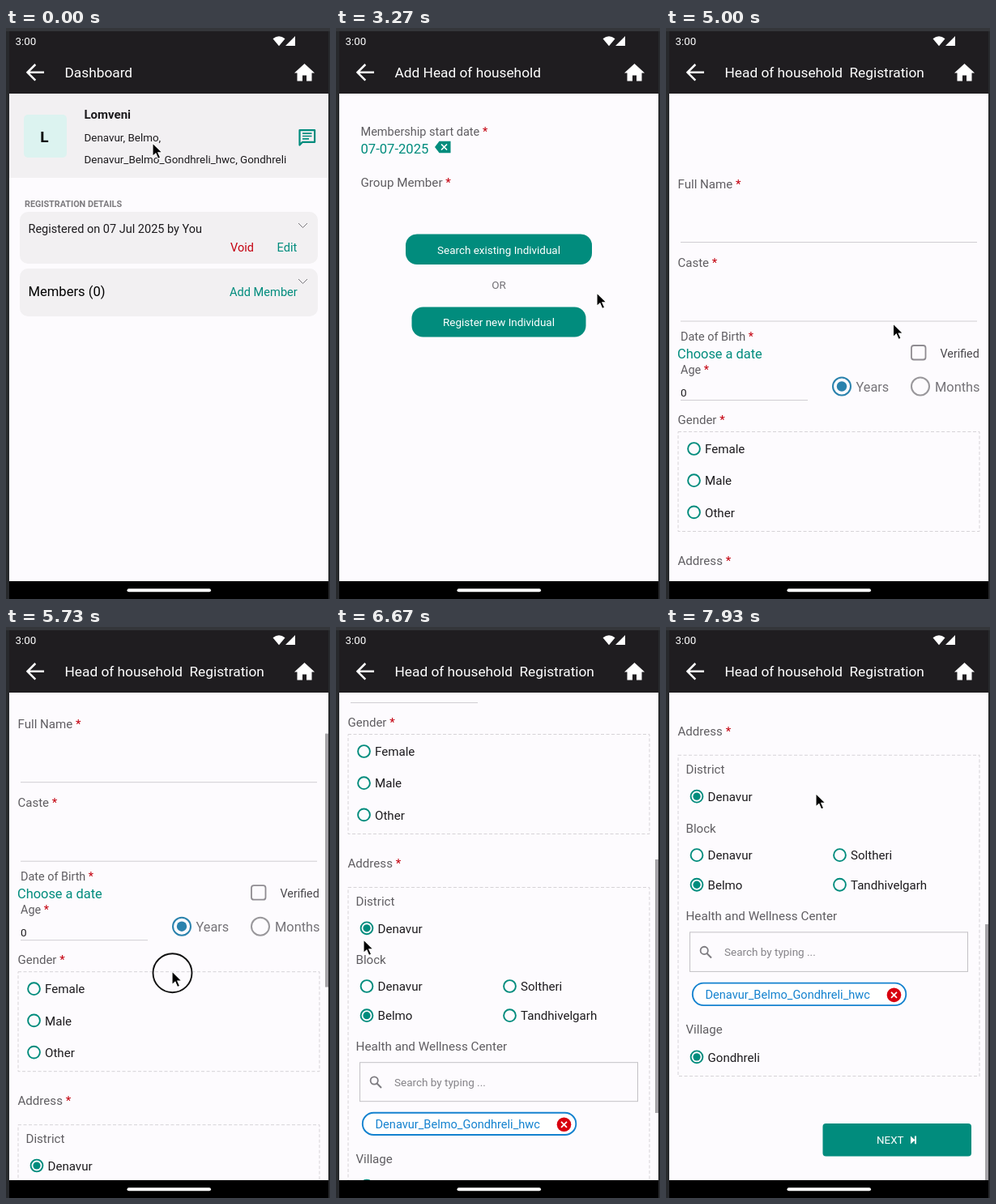
Animation of 400x705 px, one loop 8000 ms. Source, as an HTML page:

```html
<!DOCTYPE html>
<html lang="en">
<head>
<meta charset="utf-8">
<title>Household registration</title>
<style>
  html, body { margin: 0; width: 100%; height: 100%; overflow: hidden; background: #1f1d20; }
  svg { display: block; width: 100%; height: 100%; }
  text { font-family: Roboto, "Noto Sans", sans-serif; white-space: pre; }
</style>
</head>
<body>
<svg id="stage" viewBox="0 0 400 705" xmlns="http://www.w3.org/2000/svg"></svg>
<script>
const LOOP = 8000;
const TEAL = '#018c7d', GREY = '#5f5d61', DARK = '#1d1b1e', PAPER = '#fdfbfe', PANEL = '#f2f0f2', RED = '#c4000f';
const PLACE = { district: 'Denavur', block: 'Belmo', village: 'Gondhreli' };
const CENTER = `${PLACE.district}_${PLACE.block}_${PLACE.village}_hwc`;
const TOP = 93, BOTTOM = 683;  // scrolling area

// Drawing helpers
const text = (x, y, size, str, fill = DARK, more = '') =>
  `<text x="${x}" y="${y}" font-size="${size}" fill="${fill}" ${more}>${str}</text>`;
const rect = (x, y, w, h, fill, r = 0, more = '') =>
  `<rect x="${x}" y="${y}" width="${w}" height="${h}" rx="${r}" fill="${fill}" ${more}/>`;
const path = (d, stroke, width, more = '') =>
  `<path d="${d}" fill="none" stroke="${stroke}" stroke-width="${width}" ${more}/>`;
const label = (x, y, size, str) =>
  text(x, y, size, `${str} <tspan fill="${RED}">*</tspan>`, GREY);
const dashed = (y, h) =>
  rect(15, y, 372, h, 'none', 0, 'stroke="#d6d3d7" stroke-width="1" stroke-dasharray="4 2.5"');
const ring = (x, y, r, color, dot = 0, width = 2) =>
  `<circle cx="${x}" cy="${y}" r="${r}" fill="none" stroke="${color}" stroke-width="${width}"/>` +
  (dot ? `<circle cx="${x}" cy="${y}" r="${dot}" fill="${color}"/>` : '');
const option = (x, y, str, on, gap = 13.5) =>
  ring(x, y, 7.4, TEAL, on ? 4.6 : 0, 1.9) + text(x + gap, y + 5.7, 15.1, str);
const chevron = y => path(`M361 ${y}l5.5 5.5 5.5-5.5`, '#77757a', 1);
const mid = 'text-anchor="middle"';
const bold = 'font-weight="700"';

const dashboard = () =>
  rect(4, 81, 394, 104, PANEL) +
  rect(22, 107, 53, 53, '#dcf3f0', 5) +
  text(47.5, 141, 19, 'L', '#000', `${mid} ${bold}`) +
  text(96.5, 112, 15, 'Lomveni', DARK, bold) +
  text(96.5, 140, 13.4, `${PLACE.district}, ${PLACE.block},`) +
  text(96.5, 167, 13.4, `${CENTER}, ${PLACE.village}`) +
  path('M362.5 144.5V126.2h18.6v14.6h-15z', TEAL, 2.2, 'stroke-linejoin="round"') +
  path('M366 130.2h11.5M366 133.5h11.5M366 136.8h8', TEAL, 1.7) +
  text(23, 221, 10.8, 'REGISTRATION DETAILS', '#7c7a7e', bold) +
  rect(17, 227, 368, 64, PANEL, 10) +
  text(27.5, 253, 14.5, 'Registered on 07 Jul 2025 by You') + chevron(241) +
  text(277, 276, 14.5, 'Void', RED) + text(334.5, 276, 14.6, 'Edit', TEAL) +
  rect(17, 297, 368, 59, PANEL, 10) +
  text(27.5, 330.5, 16.6, 'Members (0)', '#000') + chevron(310) +
  text(276, 331, 14.6, 'Add Member', TEAL);

const addHead = () =>
  label(30.5, 133, 14.5, 'Membership start date') +
  text(30.5, 155, 16.6, '07-07-2025', TEAL) +
  `<path d="M122 147l5.5-7.2h14v14.4h-14z" fill="${TEAL}"/>` +
  path('M130 143.5l7 7m0-7l-7 7', '#fff', 1.7) +
  label(30.5, 196, 15.2, 'Group Member') +
  rect(86, 254.5, 230, 37.5, TEAL, 14) +
  text(201, 278.5, 13.45, 'Search existing Individual', '#fff', mid) +
  text(201, 321.5, 13.5, 'OR', '#757378', mid) +
  rect(93.5, 344.5, 215, 37, TEAL, 14, 'id="button"') +
  text(201, 368, 13.45, 'Register new Individual', '#fff', `${mid} id="caption"`);

const form = () =>
  label(14.5, 126, 15.1, 'Full Name') + path('M18 192.5H384', '#d0ced2', 1) +
  label(14.5, 222.5, 15, 'Caste') + path('M18 290H384', '#d0ced2', 1) +
  label(18, 313.7, 14.4, 'Date of Birth') +
  text(14, 335.7, 16.4, 'Choose a date', TEAL) +
  rect(303, 320, 17.5, 17.5, 'none', 3, 'stroke="#8f8c91" stroke-width="1.8"') +
  text(338.5, 334.7, 14.3, 'Verified', '#4a484c') +
  label(18, 355.3, 14.4, 'Age') +
  text(18, 382.5, 13.5, '0') + path('M18 387.5H175', '#d0ced2', 1) +
  ring(217, 370.5, 11, '#2a82ad', 6.2) + text(234.5, 376.5, 16.3, 'Years', '#757378') +
  ring(314, 370.5, 11, '#99979b') + text(332, 376.5, 16.4, 'Months', '#757378') +
  label(14.5, 417, 15, 'Gender') + dashed(426.5, 123) +
  ['Female', 'Male', 'Other'].map((s, i) => option(34.5, 447.5 + 39.2 * i, s)).join('') +
  label(14.5, 591, 15.1, 'Address') + dashed(615.5, 392) +
  text(24.5, 638, 15.1, 'District', GREY) + option(38, 665.8, PLACE.district, true) +
  text(24.5, 709.7, 15.1, 'Block', GREY) +
  option(38, 737.5, PLACE.district) + option(214.5, 737.5, 'Soltheri') +
  option(38, 773.7, PLACE.block, true) + option(214.5, 773.7, 'Tandhivelgarh') +
  text(24.5, 817.3, 15.25, 'Health and Wellness Center', GREY) +
  rect(29.5, 831.7, 343, 48, 'none', 0, 'stroke="#c3c1c5" stroke-width="1"') +
  ring(47.2, 854, 4.6, '#7d7b80', 0, 1.8) + path('M50.5 857.5l5.5 5.5', '#7d7b80', 2) +
  text(72, 860.7, 13.5, 'Search by typing ...', '#858388') +
  rect(32.8, 893.8, 263.5, 27.2, '#fff', 13.6, 'stroke="#1482cf" stroke-width="1.9"') +
  text(48.5, 913, 14.6, CENTER, '#1482cf') +
  `<circle cx="281.5" cy="908.3" r="8.8" fill="#d8000f"/>` +
  path('M278 904.8l7 7m0-7l-7 7', '#fff', 1.7) +
  text(24.5, 955.5, 15.1, 'Village', GREY) + option(38, 984, PLACE.village, true) +
  rect(193.5, 1065.3, 183.5, 40, TEAL, 4) +
  text(260, 1090.2, 13.4, 'NEXT', '#fff') +
  `<path d="M302 1080.700l5.500 4.800-5.500 4.800zM307 1080.700h2v9.600h-2z" fill="#fff"/>`;

const chrome = () =>
  rect(0, 0, 400, 81, '#1f1d20') + rect(0, 0, 400, 4, '#34363a') +
  text(11.5, 21, 13.4, '3:00', '#fff') +
  '<path d="M329.5 13.2Q337 7.5 344.5 13.2L337 22.3zM357 10v12h-12z" fill="#fff"/>' +
  path('M47 54.8H27M36.3 45l-9.8 9.8 9.8 9.8', '#fff', 2.5) +
  text(72.5, 61, 17.3, '', '#fff', 'id="title"') +
  '<path d="M368.5 44l12.5 11.5h-3.5v10h-6.5v-7h-5v7h-6.5v-10h-3.5z" fill="#fff"/>' +
  rect(0, BOTTOM, 400, 22, '#000') + rect(149.5, 692.3, 103.5, 4, '#fff', 2) +
  rect(0, 4, 4, 701, '#27292c') + rect(398, 4, 2, 701, '#27292c');

const stage = document.getElementById('stage');
stage.innerHTML =
  rect(0, 0, 400, 705, PAPER) +
  `<g id="page0">${dashboard()}</g><g id="page1">${addHead()}</g>` +
  `<g id="page2"><g id="view"><g id="form">${form()}</g>${rect(394, TOP, 4, 313, '#a5a3a7', 0, 'id="bar"')}</g>
   ${rect(4, 81, 394, TOP - 81, PAPER)}</g>` +
  chrome() +
  `<g id="cursor"><circle id="touch" cx="0.5" cy="2" r="24" fill="none" stroke="#111" stroke-width="1.9"/>
   <path d="M0 0V16.5L3.9 13L6.7 19.4L9.6 18.1L6.8 11.9H12z" fill="#000" stroke="#fff" stroke-width="1.1"/></g>`;

const el = id => document.getElementById(id);
const pages = [0, 1, 2].map(i => el('page' + i));
const titles = ['Dashboard', 'Add Head of household', 'Head of household  Registration'];

// Tracks: [time, easing into this point, ...values]
const linear = k => k;
const smooth = k => k * k * (3 - 2 * k);
const out = k => 1 - (1 - k) ** 3;
const pointer = [
  [0, linear, 181, 142], [1800, smooth, 302, 150], [2280, smooth, 320, 375],
  [2560, smooth, 322, 327], [3530, linear, 322, 327], [4250, smooth, 281, 364],
  [4980, linear, 281, 364], [5400, smooth, 206, 506], [5500, linear, 206, 506],
  [5730, linear, 205, 426], [5900, linear, 204, 290], [6120, linear, 204, 290],
  [6670, smooth, 34, 386], [7000, smooth, 48, 430], [7330, smooth, 190, 340],
  [7650, linear, 185, 205.5], [LOOP, linear, 185, 205.5]
];
// Offset, then the stretch on reaching the end
const scroll = [
  [0, linear, 0, 1], [5517, linear, 0, 1], [5730, linear, 72, 1], [5900, linear, 208, 1],
  [6400, out, 366, 1], [7350, linear, 366, 1], [7650, linear, 492, 1],
  [7800, out, 523.5, 1], [7930, out, 523.5, 1.011], [LOOP, linear, 523.5, 1.011]
];
function at(track, t) {
  const i = Math.max(1, track.findIndex(p => p[0] >= t));
  const [t0, , ...a] = track[i - 1], [t1, ease, ...b] = track[i];
  const k = ease((t - t0) / (t1 - t0));
  return a.map((v, n) => v + (b[n] - v) * k);
}
const clamp = k => Math.min(1, Math.max(0, k));
const mix = (a, b, k) => `rgb(${a.map((v, i) => Math.round(v + (b[i] - v) * k))})`;
const within = (t, a, b) => t >= a && t < b;

function draw(t) {
  const page = t < 2900 ? 0 : t < 4930 ? 1 : 2;
  pages.forEach((g, i) => g.setAttribute('display', i === page ? 'inline' : 'none'));
  el('title').textContent = titles[page];

  const press = clamp((t - 4480) / 150);
  el('button').setAttribute('fill', mix([1, 140, 125], [92, 197, 188], press));
  el('caption').setAttribute('fill', mix([255, 255, 255], [165, 223, 216], press));

  const [offset, stretch] = at(scroll, t);
  el('view').setAttribute('transform', `translate(0 ${BOTTOM * (1 - stretch)}) scale(1 ${stretch})`);
  el('form').setAttribute('transform', `translate(0 ${72 - offset})`);
  el('bar').setAttribute('y', TOP + offset * 0.53);
  el('bar').setAttribute('display', t < 5517 ? 'none' : 'inline');

  const [x, y] = at(pointer, t);
  el('cursor').setAttribute('transform', `translate(${x} ${y})`);
  const touching = within(t, 5470, 5900) || within(t, 7330, 7650);
  el('touch').setAttribute('display', touching ? 'inline' : 'none');
}

const start = performance.now();
function tick() {
  draw((performance.now() - start) % LOOP);
  requestAnimationFrame(tick);
}
tick();
</script>
</body>
</html>
```
